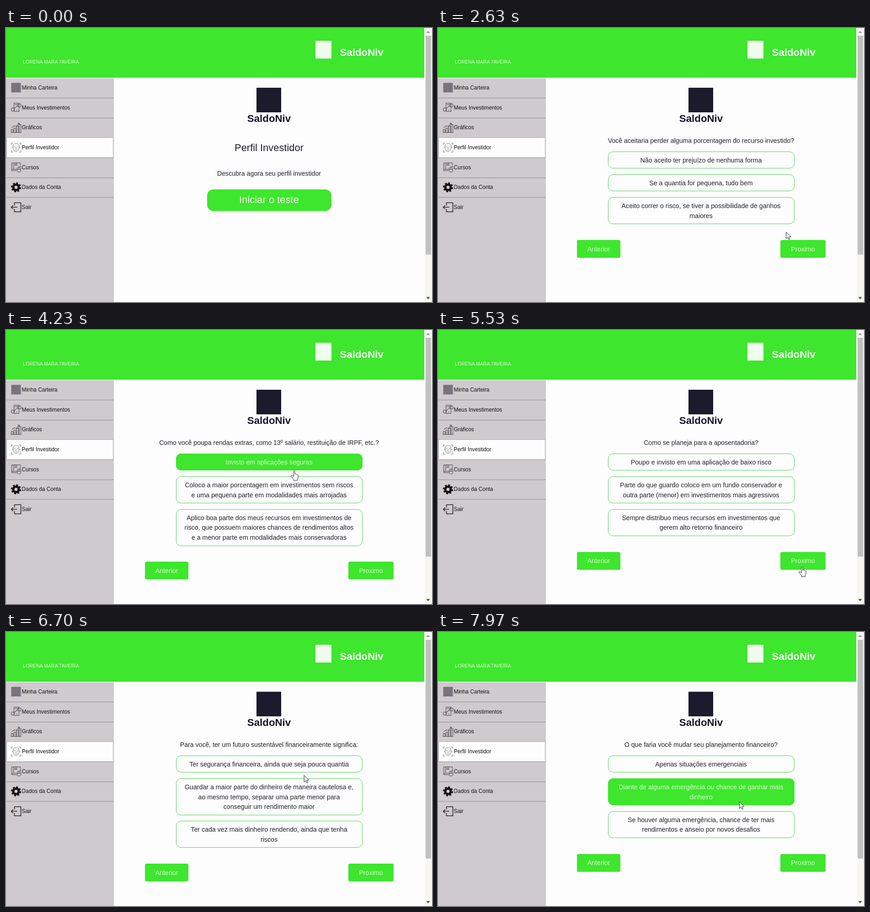
An HTML page for the animation above (8000 ms loop, 932 by 601 pixels).

```html
<!DOCTYPE html>
<html lang="pt">
<head>
<meta charset="utf-8">
<title>Perfil Investidor</title>
<style>
  html, body { margin: 0; width: 100%; height: 100%; overflow: hidden; background: #fdfdfd; }
  svg { display: block; font-family: "Liberation Sans", Arial, sans-serif; }
  .icon { fill: none; stroke: #55555c; stroke-width: 1.2; stroke-linejoin: round; }
</style>
</head>
<body>
<svg id="stage" width="932" height="601" viewBox="0 0 932 601"></svg>
<script>
const LOOP = 8000;
const GREEN = '#3ee62e', INK = '#20202a', PALE = '#d8f8d0', PAPER = '#fdfdfd';
const LINE = 21.7, CENTER = 575.5;

const rect = (x, y, w, h, fill, extra = '') =>
  `<rect x="${x}" y="${y}" width="${w}" height="${h}" fill="${fill}" ${extra}/>`;

// y is the visual middle of the capitals
const text = (str, x, y, size, fill = INK, extra = 'text-anchor="middle"') =>
  `<text x="${x}" y="${y + size * 0.355}" font-size="${size}" fill="${fill}" ${extra}>${str}</text>`;

const icons = [
  rect(1, 1, 21, 21, '#77757c', 'stroke="none"'),
  '<path d="M7 2h11v18H7zM9 5h7M12 17h2"/><circle cx="4.5" cy="16" r="3.5"/><circle cx="19" cy="7" r="3.5"/><path d="M7 14l9-7"/>',
  '<path d="M1 22V16h4v6M7 22V13h4v9M13 22V9h4v13M18 22V5h4v17M0 22.5h23M2 12L8 8l4 1 7-7M15 2h4v4"/>',
  '<path stroke="#777" stroke-width="1" d="M1 6V2h4M18 2h4v4M1 18v4h4M18 22h4v-4M5 8Q6 3 11.5 3T18 8v6q-1 5-6.5 7Q6 19 5 14zM7 10h3M13 10h3M11.5 11v4M9 17h5M2 12h3M18 12h3"/>',
  '<path d="M13 19H2V2h19v9M2 16h11M6 2v14M9 2v6l2-2 2 2V2"/><rect x="14" y="11" width="8" height="11" rx="4"/><path d="M18 11v5M14 16h8"/>',
  '<circle cx="11.5" cy="12" r="6" stroke="#111" stroke-width="5"/><circle cx="11.5" cy="12" r="9.5" stroke="#111" stroke-width="3" stroke-dasharray="4 3.46"/>',
  '<path d="M8 8V2h14v20H8v-6M1 12h13M5 8l-4 4 4 4" stroke="#222" stroke-width="1.6"/>'
];
const menu = ['Minha Carteira', 'Meus Investimentos', 'Gráficos', 'Perfil Investidor',
  'Cursos', 'Dados da Conta', 'Sair'];

const questions = [
  { from: 870, to: 2480, pick: 0, pickAt: 1500,
    title: 'Para que você investe ou investiria seu dinheiro?',
    options: ['Para não ficar com o dinheiro parado na minha conta e|correr o risco de gastar',
      'Para conseguir realizar alguns sonhos',
      'Para obter rendimento e conseguir multiplicar minha renda'] },
  { from: 2480, to: 3620, pick: 1, pickAt: 2980,
    title: 'Você aceitaria perder alguma porcentagem do recurso investido?',
    options: ['Não aceito ter prejuízo de nenhuma forma',
      'Se a quantia for pequena, tudo bem',
      'Aceito correr o risco, se tiver a possibilidade de ganhos|maiores'] },
  { from: 3620, to: 5430, pick: 0, pickAt: 4100,
    title: 'Como você poupa rendas extras, como 13º salário, restituição de IRPF, etc.?',
    options: ['Invisto em aplicações seguras',
      'Coloco a maior porcentagem em investimentos sem riscos|e uma pequena parte em modalidades mais arrojadas',
      'Aplico boa parte dos meus recursos em investimentos de|risco, que possuem maiores chances de rendimentos altos|e a menor parte em modalidades mais conservadoras'] },
  { from: 5430, to: 6340, pick: 1, pickAt: 5960,
    title: 'Como se planeja para a aposentadoria?',
    options: ['Poupo e invisto em uma aplicação de baixo risco',
      'Parte do que guardo coloco em um fundo conservador e|outra parte (menor) em investimentos mais agressivos',
      'Sempre distribuo meus recursos em investimentos que|gerem alto retorno financeiro'] },
  { from: 6340, to: 7560, pick: 1, pickAt: 6960,
    title: 'Para você, ter um futuro sustentável financeiramente significa:',
    options: ['Ter segurança financeira, ainda que seja pouca quantia',
      'Guardar a maior parte do dinheiro de maneira cautelosa e,|ao mesmo tempo, separar uma parte menor para|conseguir um rendimento maior',
      'Ter cada vez mais dinheiro rendendo, ainda que tenha|riscos'] },
  { from: 7560, to: LOOP, pick: 1, pickAt: 7900,
    title: 'O que faria você mudar seu planejamento financeiro?',
    options: ['Apenas situações emergenciais',
      'Diante de alguma emergência ou chance de ganhar mais|dinheiro',
      'Se houver alguma emergência, chance de ter mais|rendimentos e anseio por novos desafios'] }
];

// time, x, y of the tip, shape
const track = [
  [0, 945, 470, 'arrow'], [200, 945, 470, 'arrow'], [560, 690, 392, 'hand'], [700, 602, 382, 'hand'],
  [900, 602, 382, 'arrow'], [1150, 600, 345, 'arrow'], [1400, 603, 314, 'hand'], [1640, 603, 314, 'hand'],
  [1790, 607, 328, 'arrow'], [1850, 610, 333, 'arrow'], [2230, 775, 470, 'hand'], [2330, 793, 489, 'hand'],
  [2540, 793, 489, 'hand'], [2600, 775, 460, 'arrow'], [2880, 650, 352, 'hand'], [3080, 645, 346, 'hand'],
  [3160, 660, 362, 'arrow'], [3400, 768, 450, 'arrow'], [3460, 786, 474, 'hand'], [3530, 793, 489, 'hand'],
  [3680, 793, 489, 'hand'], [3760, 768, 455, 'arrow'], [4000, 635, 306, 'hand'], [4080, 627, 304, 'hand'],
  [4230, 627, 308, 'hand'], [4400, 632, 325, 'arrow'], [4850, 770, 500, 'hand'], [5020, 793, 519, 'hand'],
  [5540, 793, 519, 'hand'], [5620, 775, 484, 'arrow'], [5850, 650, 355, 'hand'], [6000, 645, 350, 'hand'],
  [6080, 680, 385, 'arrow'], [6220, 785, 500, 'hand'], [6270, 793, 513, 'hand'], [6390, 793, 513, 'hand'],
  [6440, 770, 472, 'arrow'], [6640, 653, 317, 'arrow'], [6730, 651, 314, 'arrow'], [6840, 654, 350, 'hand'],
  [7000, 657, 360, 'hand'], [7080, 675, 390, 'arrow'], [7320, 780, 514, 'hand'], [7420, 796, 531, 'hand'],
  [7600, 796, 531, 'hand'], [7650, 775, 490, 'arrow'], [7880, 661, 375, 'arrow'], [7960, 659, 373, 'arrow'],
  [LOOP, 659, 373, 'arrow']
];

const timing = (from, to) => `data-from="${from}" data-to="${to}"`;

// Borders sit on half pixels so that they stay crisp
function optionBox(lines, y, on) {
  const top = Math.round(y) + 0.5, height = Math.round(lines.length * LINE + 14.4);
  const box = rect(372.5, top, 407, height, on ? GREEN : PAPER,
    `rx="10.5" stroke="${on ? GREEN : '#4fd058'}"`);
  return box + lines.map((line, i) =>
    text(line, CENTER, y + 18.8 + i * LINE, 14.2, on ? PALE : INK)).join('');
}

const navButton = (label, x, y, w) =>
  rect(x, Math.round(y), w, 39, GREEN, 'rx="3.5"') + text(label, x + w / 2, y + 19.5, 14.3, PALE);

function questionScene(q, index) {
  let y = 271, body = text(q.title, CENTER, 247, 14.1);
  q.options.forEach((option, i) => {
    const lines = option.split('|');
    body += optionBox(lines, y, false);
    if (i === q.pick) body += `<g ${timing(q.pickAt, LOOP)}>${optionBox(lines, y, true)}</g>`;
    y += lines.length * LINE + 28.3;
  });
  y += 22.3;
  if (index) body += navButton('Anterior', 304, y, 95);
  body += navButton('Proximo', 749, y, 99);
  return `<g ${timing(q.from, q.to)}>${body}</g>`;
}

function menuItem(label, i) {
  const top = 110 + i * 43.65, mid = top + 20.8;
  const active = i === 3 ? rect(1.5, 240.5, 233, 44, PAPER, 'stroke="#a9adbd"') : '';
  const rule = i < 6 ? rect(2, Math.round(top + 43.2), 233, 1, '#8c8a8c') : '';
  return active + rule + `<g class="icon" transform="translate(10.5 ${mid - 11.5})">${icons[i]}</g>` +
    text(label, 34.5, mid, 11.9, '#111', '');
}

const bold = 'font-weight="700"';
const chrome =
  rect(0, 0, 932, 601, PAPER) +
  rect(0, 0, 915, 109, GREEN) +
  text('LORENA MARA TAVEIRA', 37, 74.5, 10.6, PALE, '') +
  rect(677, 28, 35, 39, '#f0fcec') +
  text('SaldoNiv', 730.5, 53, 22.3, '#fbfff8', bold) +
  rect(0, 110, 236, 491, '#cfcacd') +
  menu.map(menuItem).join('') +
  rect(548, 131, 54, 54, '#1b1b2d') +
  text('SaldoNiv', CENTER, 198, 22.3, '#14142a', bold + ' text-anchor="middle"') +
  rect(916, 0, 16, 601, '#f7f6f2') +
  rect(918, 17, 12, 480, '#c2c1c1') +
  '<path d="M919.5 11l4-5 4 5z" fill="#9a9a9a"/><path d="M919.5 590l4 5 4-5z" fill="#505050"/>';

const intro = `<g ${timing(0, 870)}>` +
  text('Perfil Investidor', CENTER, 262.5, 21.9) +
  text('Descubra agora seu perfil investidor', CENTER, 319, 14.2) +
  rect(440, 354, 272, 47.5, GREEN, 'rx="14"') +
  text('Iniciar o teste', CENTER, 376.5, 22, '#effcea') + '</g>';

const cursor = `<g id="cursor" fill="#fff" stroke="#20202c" stroke-linejoin="round">
  <path id="arrow" d="M.5-.5V14l3.3-3.1 2.3 5.1 2.4-1-2.3-5H11z"/>
  <path id="hand" d="M2 1.5Q3.5-.5 5 1.5V8q1.5-1.2 2.7.5Q9.2 7.5 10.3 9.2 12 8.5 12 11v5l-1.7 3.5V22H2.5v-2.5L-3.3 13q-.8-2.3 1.5-2L2 13.3z"/>
</g>`;

const stage = document.getElementById('stage');
stage.innerHTML = chrome + intro + questions.map(questionScene).join('') + cursor;

const loop = (el, frames) => el.animate(frames, { duration: LOOP, iterations: Infinity });
const step = (time, on) => ({ offset: time / LOOP, opacity: on ? 1 : 0, easing: 'steps(1, end)' });

stage.querySelectorAll('[data-from]').forEach(el => {
  const from = +el.dataset.from, to = +el.dataset.to;
  const frames = from ? [step(0, false), step(from, true)] : [step(0, true)];
  if (to < LOOP) frames.push(step(to, false));
  frames.push(step(LOOP, to === LOOP));
  loop(el, frames);
});

loop(document.getElementById('cursor'), track.map(([time, x, y]) =>
  ({ offset: time / LOOP, transform: `translate(${x}px, ${y}px)` })));
for (const shape of ['arrow', 'hand']) {
  loop(document.getElementById(shape), track.map(([time, , , kind]) => step(time, kind === shape)));
}
</script>
</body>
</html>
```
